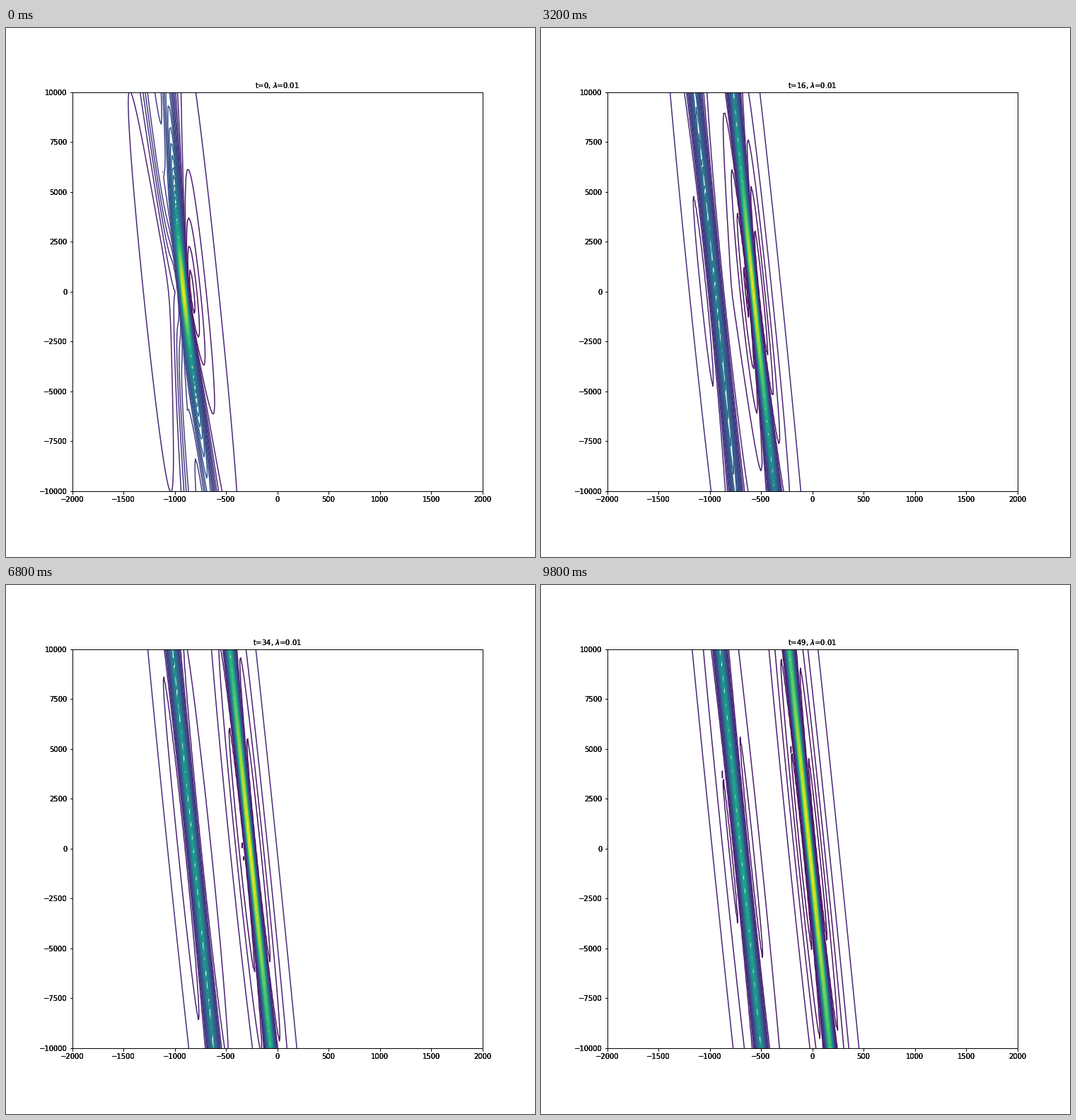
These frames come from a looping animation (748x748 px, 10000 ms). A matplotlib script:

```python
import numpy as np
import matplotlib.pyplot as plt
from matplotlib.animation import FuncAnimation

SIZE, DPI = 748, 72
LAM = 0.01
X0, SPEED = -1000, 12
FRAMES, INTERVAL = 50, 200
LAYERS = 3  # stacked axes give the heavy black text and frame

x, y = np.meshgrid(np.linspace(-2000, 2000, 300),
                   np.linspace(-10000, 10000, 300))


def wave(t):
    """Two-lump rational solution u = 2 (log tau)_xx."""
    p = LAM * (x + 2 * LAM * y - X0 - SPEED * t)
    c = 24 * LAM * t
    q = p**2 - p - c
    tau = q**2 + 2 * p**2 - 3 * p - c + 1.5 + (2 * LAM**2 * y)**2
    d1 = 2 * q * (2 * p - 1) + 4 * p - 3
    d2 = 2 * (2 * p - 1)**2 + 4 * q + 4
    return 2 * LAM**2 * (d2 / tau - (d1 / tau)**2)


def add_layer(index):
    rect = np.array([93.5, SIZE - 655, 580, 564.5]) / SIZE
    ax = fig.add_axes(rect, label=f"layer{index}")
    if index:
        ax.patch.set_visible(False)
    ax.set_xlim(-2000, 2000)
    ax.set_ylim(-10000, 10000)
    ax.set_xticks(range(-2000, 2001, 500))
    ax.set_yticks(range(-10000, 10001, 2500))
    return ax


fig = plt.figure(figsize=(SIZE / DPI, SIZE / DPI), dpi=DPI, facecolor="white")
axes = [add_layer(i) for i in range(LAYERS)]
titles = [ax.set_title("", fontsize=10) for ax in axes]
drawn = []


def init():
    while drawn:
        drawn.pop().remove()
    return []


def update(t):
    init()
    drawn.append(axes[0].contour(x, y, wave(t), 50, cmap="viridis"))
    for title in titles:
        title.set_text(rf"t={t}, $\lambda$=0.01")
    return []


anim = FuncAnimation(fig, update, frames=FRAMES, init_func=init,
                     interval=INTERVAL, repeat=True, repeat_delay=0,
                     blit=False)
plt.show()
```
